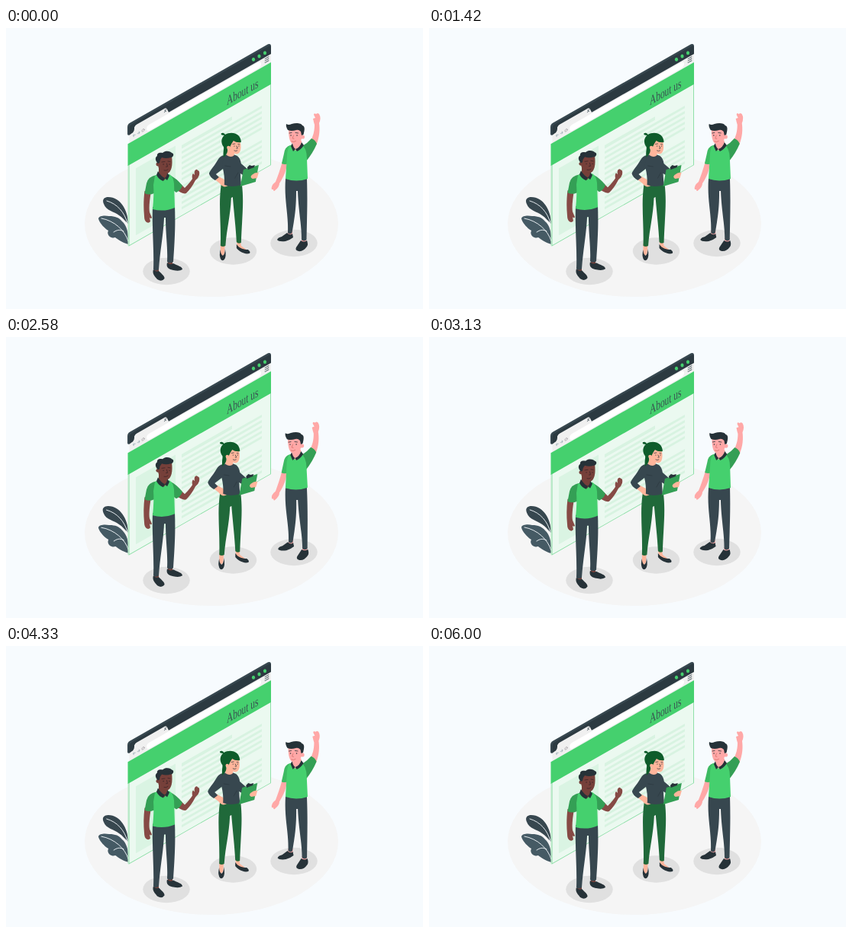
An HTML page that plays this animation: 546x369 px, repeating every 6.04 s.

```html
<!DOCTYPE html>
<html lang="en">
<head>
<meta charset="utf-8">
<title>About us</title>
<style>
  html, body { margin: 0; width: 100%; height: 100%; overflow: hidden; background: #f7fbfe; }
  svg { display: block; width: 546px; height: 369px; }
  .ink { fill: #263238; }
  .slate { fill: #37474f; }
  .steel { fill: #455a64; }
  .green { fill: #45d06e; }
  .shade { fill: #349f55; }
  .brown { fill: #864a45; }
  .face { fill: #76403a; }
  .peach { fill: #ffb59b; }
  .pink { fill: #ffa8a7; }
  .forest { fill: #20693a; }
  .hair { fill: #0e5c2b; }
  .line { fill: none; stroke-linecap: round; stroke-linejoin: round; }
</style>
</head>
<body>
<svg viewBox="0 0 546 369">
  <ellipse cx="269" cy="257" rx="166" ry="96" fill="#f5f5f5"/>
  <g fill="#e0e0e0">
    <ellipse cx="210" cy="319.5" rx="30.7" ry="17.7"/>
    <ellipse cx="297.5" cy="293" rx="30.7" ry="17.7"/>
    <ellipse cx="377" cy="282.5" rx="30.7" ry="17.7"/>
  </g>

  <g id="plant">
    <path class="slate" d="M160 257C160 240 150 222 134 222C127 222 126 227 128 231C131 240 142 241 148 246C153 249 156 254 160 257Z"/>
    <path class="steel" d="M160 284C152 282 146 277 143 275C138 277 131 272 134 266C130 264 122 256 121 250C122 246 130 246 135 247C143 247 148 249 152 254C159 260 161 272 160 284Z"/>
    <path class="line" stroke="#f7fbfe" stroke-width=".9" d="M132 227C146 231 155 242 159 256M125 250C142 253 156 266 160 280M141 268C147 264 150 265 154 267"/>
  </g>

  <!-- Window face: one unit across is one pixel, sheared up along the wall -->
  <g transform="matrix(1 -.572 0 1 160 0)">
    <path class="slate" d="M-1 139V130Q-1 126 2 126H183Q187 127 187 131V141H0Z"/>
    <path fill="#2c3a41" d="M1.500 141V132Q1.500 129 4 129H184Q187 129 187 132V142H1.500Z"/>
    <path fill="#f0f0f0" d="M1.500 152V143Q1.500 141 4 141H6Q8 140 8 137V135Q9 133 11 133H48Q50 133 51 136L53 141H187V152Z"/>
    <rect x="24" y="142.500" width="150" height="8" rx="4" fill="#fff"/>
    <rect x="1" y="180" width="185.500" height="106.500" fill="#ebf9f0" stroke="#86dda2" stroke-width=".9"/>
    <rect x="-.5" y="180" width="2.500" height="106" fill="#b9e9c8"/>
    <rect x="-.5" y="152" width="187.500" height="28.700" class="green"/>
    <rect x="10" y="190" width="52" height="88" fill="#daf4e3"/>
    <g id="copy" fill="#d8f3e1"></g>
    <g class="line" stroke="#37474f" stroke-width=".8">
      <path d="M179 143h5M179 145.500h5M179 148h5"/>
      <path stroke-width=".6" d="M47.500 135l2.200 3M49.700 135l-2.200 3"/>
      <path stroke="#90a4ae" stroke-width=".6" d="M9.500 145.500h-3l1-1.500M6.500 145.500l1 1.500M12 145.500h3l-1-1.500M15 145.500l-1 1.500"/>
      <circle cx="19.500" cy="145.500" r="1.600" stroke="#a8a3a8" stroke-width=".7"/>
    </g>
  </g>
  <g class="green">
    <ellipse cx="324" cy="41.300" rx="2.100" ry="2.500"/>
    <ellipse cx="331.500" cy="37" rx="2.100" ry="2.500"/>
    <ellipse cx="339" cy="32.800" rx="2.100" ry="2.500"/>
  </g>
  <text transform="matrix(.65 -.375 0 1 289 101.500)" font-size="17.500" font-family="'Liberation Serif', Times, serif" fill="#37474f" fill-opacity=".9">About us</text>

  <g id="left">
    <path class="face" d="M194 312h6v10h-6zM212 303h6v9h-6z"/>
    <path class="slate" d="M192 235H221C222 258 221 278 219 307Q215 310 211 307C212 288 209 272 209 249L207 249C206 272 202 290 200 317Q196 320 193 317C194 292 191 264 192 235Z"/>
    <path class="ink" d="M193 317Q196 321 200 319C204 323 208 326 207.500 329Q204 334 198 330C195 326 191 323 193 317ZM211 308Q215 312 219 309C224 312 231 313 231 317Q227 320 219 318C214 317 209 315 211 308Z"/>
    <path class="brown" d="M181.500 214H190C188 226 187 236 188 242L191 249Q190 251 188 249L189 254Q187 257 184 255Q181 253 181 247C180 236 180 226 181.500 214Z"/>
    <path class="brown" d="M221 211L229 205L234 210C239 205 242 201 244 198Q243 193 245 191L247 193Q246 188 248 186.500Q250 185 251 187Q254 187 253 193Q252 197 248 200C244 208 240 213 236 217Q232 219 221 211Z"/>
    <path class="shade" d="M197 193Q186 195 184 204L181.500 217Q187 220 194 217ZM214 193Q223 197 231 207Q229 213 223 216L216 211Z"/>
    <path class="green" d="M195 194Q199 192 205 193L214 192Q219 195 220 204L221 236Q207 242 192 238Q194 218 193 206Z"/>
    <path class="face" d="M200 184h12v11l-5 5-7-6z"/>
    <path class="ink" d="M199 188Q203 195 208 197L206 201Q200 199 197 193ZM208 197Q211 195 211 190L214 194L211 200Z"/>
    <path class="face" d="M200 168H217C218.500 180 217 190 210 191.500C203 191 200 187 199 180Z"/>
    <circle class="face" cx="198.800" cy="179" r="2.400"/>
    <path class="ink" d="M199 178C195 174 195 170 198 168C197 164 202 163 205 164C209 160 216 162 217 164C221 165 219 170 216 170Q209 172 204 170Q201 173 201 177Z"/>
    <g class="line" stroke="#3c2528" stroke-width=".8">
      <path d="M204 176l4-.5M212 175l3 .5M210.500 178l1 4-2 .2M207 187q3 1 5-1"/>
      <path stroke-width="1.300" d="M206 179h.2M214 179h.2"/>
    </g>
  </g>

  <g id="woman">
    <path class="peach" d="M281 283h6l-1 13-3 4-2-5zM302 279h5l1 7 8 6-3 2-10-6z"/>
    <path class="forest" d="M282 205H309C312 229 309 250 308 282Q304 284 302 281C301 262 299 246 297 222L295 223C294 247 289 264 287.500 286Q284 288 281 286C282 256 278 230 282 205Z"/>
    <path class="ink" d="M281 291Q281 297 284 299Q287 297 287 290Q289 300 286 304Q283 307 281 303Q279 298 281 291ZM302 284C306 290 312 291 317 291Q321 294 319 296C312 298 304 292 302 289Z"/>
    <path class="peach" d="M275 193L286 199L291 207Q285 211 280 204L271 197Z"/>
    <path class="slate" d="M286 167Q280 168 277 174C273 181 268 186 266 191Q267 196 274 200L279 196L275 192L288 182Z"/>
    <path class="slate" d="M286 167Q296 164 303 168Q307 171 308 178L316 185L312 194L307 191L308 206Q296 210 286 206C287 194 284 185 283 179Z"/>
    <path class="peach" d="M289 160h10v7q-4 4-10 0z"/>
    <path class="shade" d="M311 186L331 180L327 202L307 208Z"/>
    <path class="ink" d="M316 183l3-3 3 1 4-1-1 3-8 3z"/>
    <path class="peach" d="M331 190Q327 189 322 193Q319 196 323 198L329 197Z"/>
    <path class="peach" d="M290 148L306 146C309 156 308 165 302 165.500C294 164 291 161 289 156Z"/>
    <path class="hair" d="M285 170C284 162 286 158 285 156C281 151 282 144 286 141C280 141 281 137 285 138Q287 139 287 140C295 135 308 138 308 150Q302 151 298 148Q295 152 293 157L290 158C291 163 289 166 285 170Z"/>
    <circle class="peach" cx="291.500" cy="157" r="2.200"/>
    <g class="line" stroke="#263238" stroke-width=".7">
      <path d="M297 152.500l3-.5M304 152.500l2 .4M302 155l1.500 3-1.500.2M299 161q2 1.500 4 0"/>
      <path stroke-width="1.200" d="M299 155h.1M305 155h.1"/>
      <path stroke-width=".5" d="M287 181l7 1M304 190l-4 7"/>
    </g>
  </g>

  <g id="right">
    <path class="pink" d="M369 266h6v8h-6zM387 276h6v7h-6z"/>
    <path class="slate" d="M366 198H394C395 229 394 250 393.500 278Q390 281 387 278C387 257 383 241 382 214L380 214C380 241 377 253 374.500 269Q372 272 369 269C370 243 364 227 366 198Z"/>
    <path class="ink" d="M368 269Q372 273 375 270L376 275Q371 279 366 280Q357 281 355 278Q356 275 361 274ZM386 279Q390 282 394 279Q396 284 394 287Q389 294 383 293Q378 292 380 288Z"/>
    <path class="pink" d="M362 175H369C367 187 364 195 358 204Q358 209 352 213.500Q350 215 350 212L348 212Q346.500 207 353 202C356 194 359 186 362 175Z"/>
    <path class="pink" d="M399 148L406 154C411 143 411 132 410 125Q413 118 410 113Q408 111 406 113Q403 111 403 114L405 118L402 119Q403 124 404 127C404 136 402 142 399 148Z"/>
    <path class="shade" d="M388 155Q395 151 400 145Q405 147 407 152Q402 164 393 175Z"/>
    <path fill="#3dba62" d="M372 154Q365 156 364 165L361 178Q365 180 370 178Z"/>
    <path class="green" d="M372 154Q368 159 368 168L366 198Q380 203 395 198L394 172Q394 157 386 152Z"/>
    <path class="pink" d="M376 148h11v7l-8 6-4-5z"/>
    <path class="ink" d="M375 151Q376 157 379 159L376 162L373 155ZM379 159Q385 157 387 150L390 154Q386 160 381 162Z"/>
    <path class="pink" d="M370 131H387C389 143 387 152 379 153.500C372 152 370 147 370 131Z"/>
    <circle class="pink" cx="388.500" cy="143" r="2.600"/>
    <path class="ink" d="M369 134Q366 129 367 126Q370 128 374 126C380 124 387 125 388 128C392 129 391 134 389.500 140L387 141L386 136Q383 133 380 134Q374 136 369 134Z"/>
    <g class="line" stroke="#263238" stroke-width=".8">
      <path d="M371 138l3-.5M379 137.500l3.500.5"/>
      <path stroke-width="1.400" d="M373 141h.1M381 141h.1"/>
      <path stroke="#d7726e" d="M376.500 141l-1.500 4 2 .3M374 149q3 1.500 5.500-.5"/>
    </g>
  </g>
</svg>
<script>
  const get = id => document.getElementById(id);
  const move = (id, value) => get(id).setAttribute('transform', value);

  // Paragraphs on the page: a thick heading, then rows with a short last line
  let rows = '<rect x="70" y="194" width="66" height="4.500"/>';
  for (let i = 0; i < 11; i++) {
    const width = i % 6 === 5 ? 70 : 105;
    rows += `<rect x="70" y="${202 + i * 7 + (i > 5 ? 3 : 0)}" width="${width}" height="3.4"/>`;
  }
  get('copy').innerHTML = rows;

  const start = performance.now();

  function draw(now) {
    const t = Math.max(0, now - start) % 6040;
    const phase = t % 1500 / 1500;
    const lift = 1 - Math.abs(1 - 2 * phase);
    const sway = 1 - Math.abs(((phase + .25) % 1) * 4 - 2);
    const drift = (1 + Math.cos((t - 3500) / 6000 * 2 * Math.PI)) / 2;
    move('left', `translate(0 ${-6.6 * lift})`);
    move('woman', `translate(${-2.2 * drift} 0)`);
    move('right', `rotate(${sway} 380 203)`);
    move('plant', `rotate(${sway} 141 253)`);
    requestAnimationFrame(draw);
  }
  draw(start);
</script>
</body>
</html>
```
